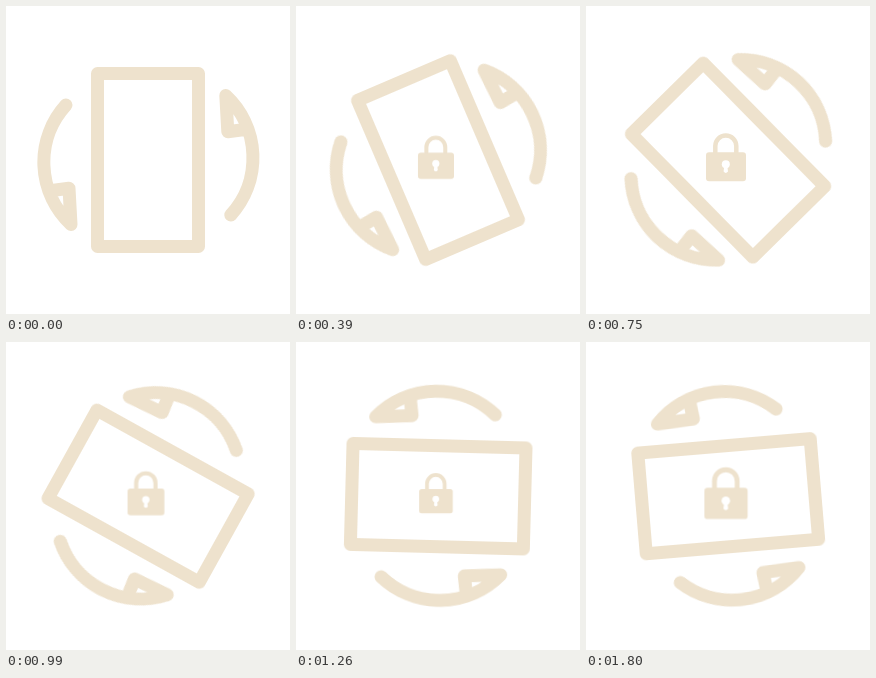
Write an HTML page without scripts that moves like this. It is 284 by 308 pixels and loops after 1.83 s.

```html
<!DOCTYPE html>
<html lang="en">
<head>
<meta charset="utf-8">
<title>Rotation lock</title>
<style>
  html, body { margin: 0; width: 100%; height: 100%; overflow: hidden; background: #fff; }
  svg { display: block; width: 284px; height: 308px; }
  .line { fill: none; stroke: #eee2cd; stroke-width: 13; stroke-linecap: round; stroke-linejoin: round; }
  .spin { transform-origin: 142.2px 154px; animation: spin 1830ms infinite; }
  .lock { transform-origin: 139.8px 151.4px; animation: pop 1830ms infinite; }

  /* each stretch advances in 30 ms steps */
  @keyframes spin {
    0% { transform: rotate(0deg); animation-timing-function: steps(25); }
    40.9836% { transform: rotate(-44.6deg); animation-timing-function: steps(8); }
    54.0984% { transform: rotate(-61deg); animation-timing-function: steps(3); }
    59.0164% { transform: rotate(-70deg); animation-timing-function: steps(4); }
    65.5738% { transform: rotate(-83deg); animation-timing-function: steps(2); }
    68.8525% { transform: rotate(-88.5deg); animation-timing-function: steps(7); }
    80.3279% { transform: rotate(-89.5deg); animation-timing-function: steps(6); }
    90.1639% { transform: rotate(-91.7deg); animation-timing-function: steps(5); }
    98.3607%, 100% { transform: rotate(-94.8deg); }
  }
  @keyframes pop {
    0% { transform: scale(0); animation-timing-function: steps(4); }
    6.5574% { transform: scale(.45); animation-timing-function: steps(4); }
    13.1148% { transform: scale(.73); animation-timing-function: steps(5); }
    21.3115% { transform: scale(.9); animation-timing-function: steps(7); }
    32.7869% { transform: scale(1); animation-timing-function: steps(5); }
    40.9836% { transform: scale(1); animation-timing-function: steps(8); }
    54.0984% { transform: scale(.92); animation-timing-function: steps(9); }
    68.8525% { transform: scale(.84); animation-timing-function: steps(7); }
    80.3279% { transform: scale(1.03); animation-timing-function: steps(11); }
    98.3607%, 100% { transform: scale(1.08); }
  }
</style>
</head>
<body>
<svg viewBox="0 0 284 308">
  <defs>
    <path id="arrow" d="M60 99A85 85 0 0 0 65 218.5L63 182.3L46 184.5"/>
  </defs>
  <g class="spin line">
    <rect x="91.5" y="67.5" width="101" height="173"/>
    <use href="#arrow"/>
    <use href="#arrow" transform="rotate(180 142.4 154)"/>
  </g>
  <g class="lock">
    <path d="M129.3 148v-8a10.5 10.5 0 0 1 21 0v8" fill="none" stroke="#eee2cd" stroke-width="4.5"/>
    <rect x="120" y="146.2" width="40" height="29" rx="3" fill="#eee2cd"/>
    <circle cx="139.8" cy="158.2" r="4" fill="#fff"/>
    <path d="M138.4 159h2.8l.8 6.6q-2.2 2.6-4.4 0z" fill="#fff"/>
  </g>
</svg>
</body>
</html>
```
